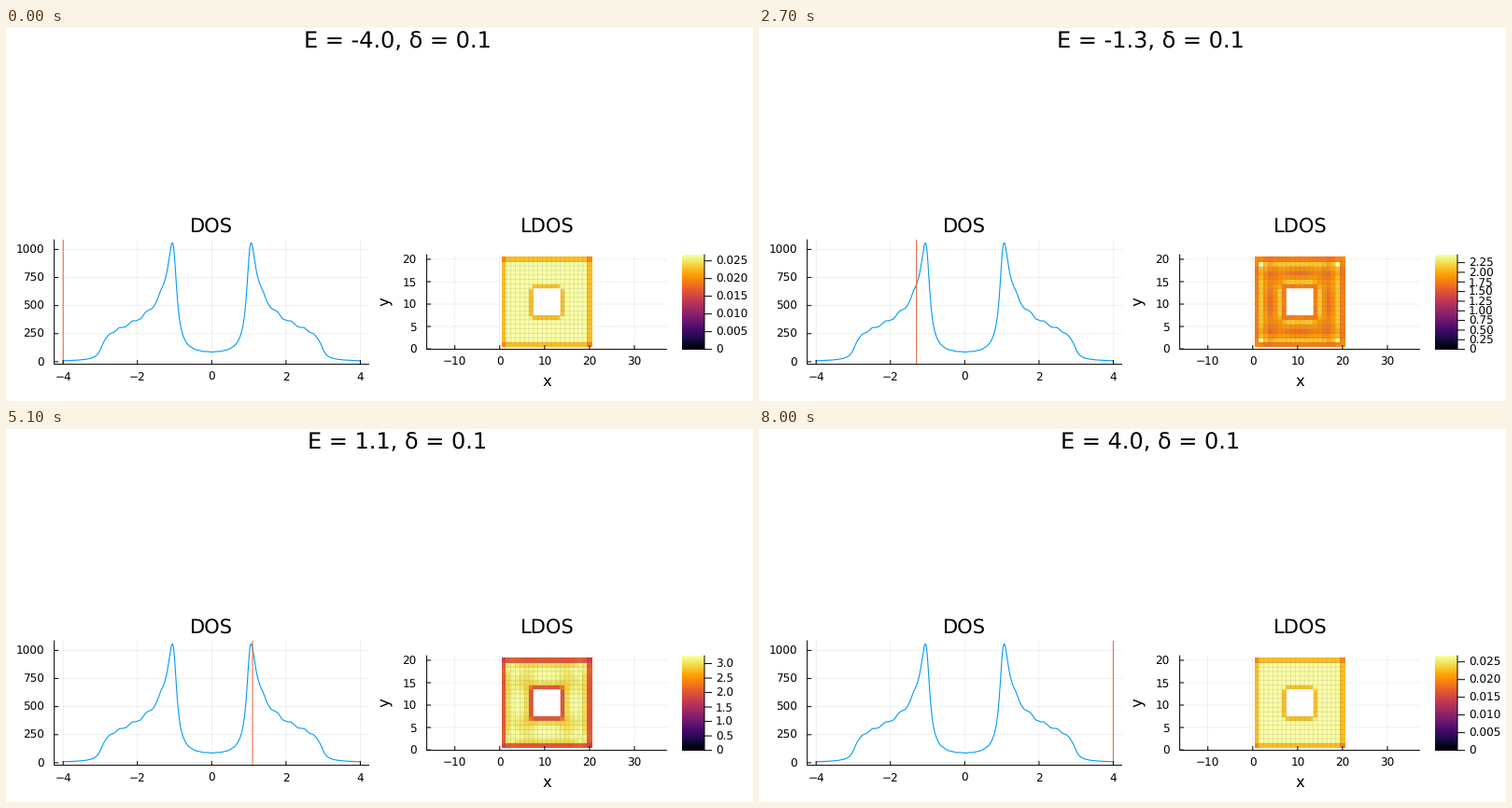
A matplotlib script that plays this animation: 800 by 400 pixels, repeating every 8.1 s.

```python
import math

import matplotlib.pyplot as plt
import numpy as np
from matplotlib.animation import FuncAnimation
from matplotlib.patches import Rectangle

W, H, DPI = 800, 400, 100
PX = 72 / DPI  # points per pixel
N, HOLE = 20, range(8, 14)
MASS, DELTA = 1.0, 0.1
BLUE, ORANGE = (0, 0.605, 0.979), (0.889, 0.436, 0.278)

plt.rcParams.update({"font.family": "DejaVu Sans", "text.hinting": "none",
                     "path.snap": False})


def solve_lattice():
    """Spectrum and site weights of a two-band Chern insulator with a square hole."""
    sx = np.array([[0, 1], [1, 0]], complex)
    sy = np.array([[0, -1j], [1j, 0]])
    sz = np.diag([1, -1]).astype(complex)
    sites = [(x, y) for y in range(1, N + 1) for x in range(1, N + 1)
             if not (x in HOLE and y in HOLE)]
    index = {site: k for k, site in enumerate(sites)}
    ham = np.zeros((2 * len(sites),) * 2, complex)
    for (x, y), k in index.items():
        a = slice(2 * k, 2 * k + 2)
        ham[a, a] = MASS * sz
        for neighbour, pauli in (((x + 1, y), sx), ((x, y + 1), sy)):
            if neighbour in index:
                j = index[neighbour]
                b = slice(2 * j, 2 * j + 2)
                hop = (sz + 1j * pauli) / 2
                ham[b, a] = hop
                ham[a, b] = hop.conj().T
    levels, states = np.linalg.eigh(ham)
    weights = (np.abs(states) ** 2).reshape(len(sites), 2, -1).sum(axis=1)
    return sites, levels, weights


SITES, LEVELS, WEIGHTS = solve_lattice()
COLS = np.array([x - 1 for x, _ in SITES])
ROWS = np.array([y - 1 for _, y in SITES])


def broadened(energy):
    return DELTA / ((energy - LEVELS) ** 2 + DELTA ** 2)


def local_density(energy):
    grid = np.full((N, N), np.nan)
    grid[ROWS, COLS] = WEIGHTS @ broadened(energy)
    return np.ma.masked_invalid(grid)


def tick_step(top):
    n = math.floor(math.log10(top))
    factor = top / 10 ** n
    unit = 1 if factor > 5 else 0.5 if factor > 2.5 else 0.25
    decimals = max(0, -n + (0 if unit == 1 else 1 if unit == 0.5 else 2))
    return unit * 10.0 ** n, decimals


fig = plt.figure(figsize=(W / DPI, H / DPI), dpi=DPI, facecolor="white")


def pixel_axes(left, top, right, bottom, xlim, ylim):
    ax = fig.add_axes([left / W, 1 - bottom / H, (right - left) / W, (bottom - top) / H])
    ax.set(xlim=xlim, ylim=ylim, facecolor="none")
    return ax


stage = pixel_axes(0, 0, W, H, (0, W), (H, 0))
stage.axis("off")
stage.set_zorder(5)


def label(x, baseline, text, size, ha="center", **kw):
    return stage.text(x, baseline, text, fontsize=size * PX, ha=ha,
                      va="baseline", color="black", **kw)


def stroke(xs, ys):
    return stage.plot(xs, ys, color="black", lw=PX, solid_capstyle="butt")[0]


def style_axes(ax, box, xticks, yticks, tick=4.5):
    left, top, right, bottom = box
    ax.set_xticks(xticks, [""] * len(xticks))
    ax.set_yticks(yticks, [""] * len(yticks))
    ax.tick_params(length=0)
    ax.grid(color="black", alpha=0.1, linewidth=0.6 * PX)
    ax.set_axisbelow(True)
    ax.spines[:].set_visible(False)
    stroke([left, left, right], [top, bottom, bottom])
    (x0, x1), (y0, y1) = ax.get_xlim(), ax.get_ylim()
    for t in xticks:
        px = left + (t - x0) / (x1 - x0) * (right - left)
        stroke([px, px], [bottom, bottom - tick])
        label(px, bottom + 17.6, str(t).replace("-", "\u2212"), 12)
    for t in yticks:
        py = bottom - (t - y0) / (y1 - y0) * (bottom - top)
        stroke([left, left + tick], [py, py])
        label(left - 10.7, py + 4.4, str(t), 12, "right")


# Density of states
energies = np.linspace(-4, 4, 801)
dos = np.array([broadened(e).sum() for e in energies])
pad = 0.03 * np.ptp(dos)
dos_box = (51.65, 226.7, 389, 360.6)
dos_ax = pixel_axes(*dos_box, (-4.24, 4.24), (dos.min() - pad, dos.max() + pad))
style_axes(dos_ax, dos_box, range(-4, 5, 2), range(0, 1001, 250))
dos_ax.plot(energies, dos, color=BLUE, lw=1.1 * PX)
marker = dos_ax.axvline(-4, color=ORANGE, lw=1.1 * PX, zorder=3)
label(220, 218.5, "DOS", 21)

# Local density of states
map_box = (450.6, 242.7, 707.9, 344.6)
half = 257.3 / 4.807 / 2
map_ax = pixel_axes(*map_box, (10.5 - half, 10.5 + half), (-0.1, 21.1))
style_axes(map_ax, map_box, range(-10, 31, 10), range(0, 21, 5))
edges = np.arange(N + 1) + 0.5
mesh = map_ax.pcolormesh(edges, edges, local_density(-4), cmap="inferno", zorder=2)
seams = dict(color="0.5", alpha=0.27, lw=0.7 * PX, zorder=3)
map_ax.vlines(edges[1:-1], 0.5, 20.5, **seams)
map_ax.hlines(edges[1:-1], 0.5, 20.5, **seams)
map_ax.add_patch(Rectangle((7.5, 7.5), 6, 6, fc="white", ec="none", zorder=4))
label(579.5, 218.5, "LDOS", 21)
label(579.5, 384.5, "x", 16.5)
label(410, 293, "y", 16.5, rotation=90, rotation_mode="anchor")

# Colour bar
BAR_TOP, BAR_BOTTOM, BAR_RIGHT = 242.7, 344.6, 748
bar_ax = pixel_axes(724, BAR_TOP, BAR_RIGHT, BAR_BOTTOM, (0, 1), (0, 1))
bar_ax.imshow(np.linspace(0, 1, 256)[:, None], cmap="inferno", origin="lower",
              extent=(0, 1, 0, 1), aspect="auto")
bar_ax.axis("off")
stroke([BAR_RIGHT] * 2, [BAR_TOP, BAR_BOTTOM])
bar_ticks = [(stroke([], []), label(760, 0, "", 12, "left")) for _ in range(12)]

heading = label(419.5, 21, "", 24)
stage.set(xlim=(0, W), ylim=(H, 0))


def update(frame):
    energy = (frame - 40) / 10
    heading.set_text(f"E = {energy:.1f}, δ = {DELTA}")
    marker.set_xdata([energy, energy])
    density = local_density(energy)
    top = density.max()
    mesh.set_array(density)
    mesh.set_clim(0, top)
    step, decimals = tick_step(top)
    for k, (line, text) in enumerate(bar_ticks):
        shown = k * step <= top
        line.set_visible(shown)
        text.set_visible(shown)
        if shown:
            y = BAR_BOTTOM - k * step / top * (BAR_BOTTOM - BAR_TOP)
            line.set_data([BAR_RIGHT, BAR_RIGHT + 8], [y, y])
            text.set_y(y + 4.4)
            text.set_text(f"{k * step:.{decimals}f}" if k else "0")
    return []


animation = FuncAnimation(fig, update, frames=81, interval=100, init_func=lambda: [],
                          repeat=True, repeat_delay=0, blit=False)
plt.show()
```
